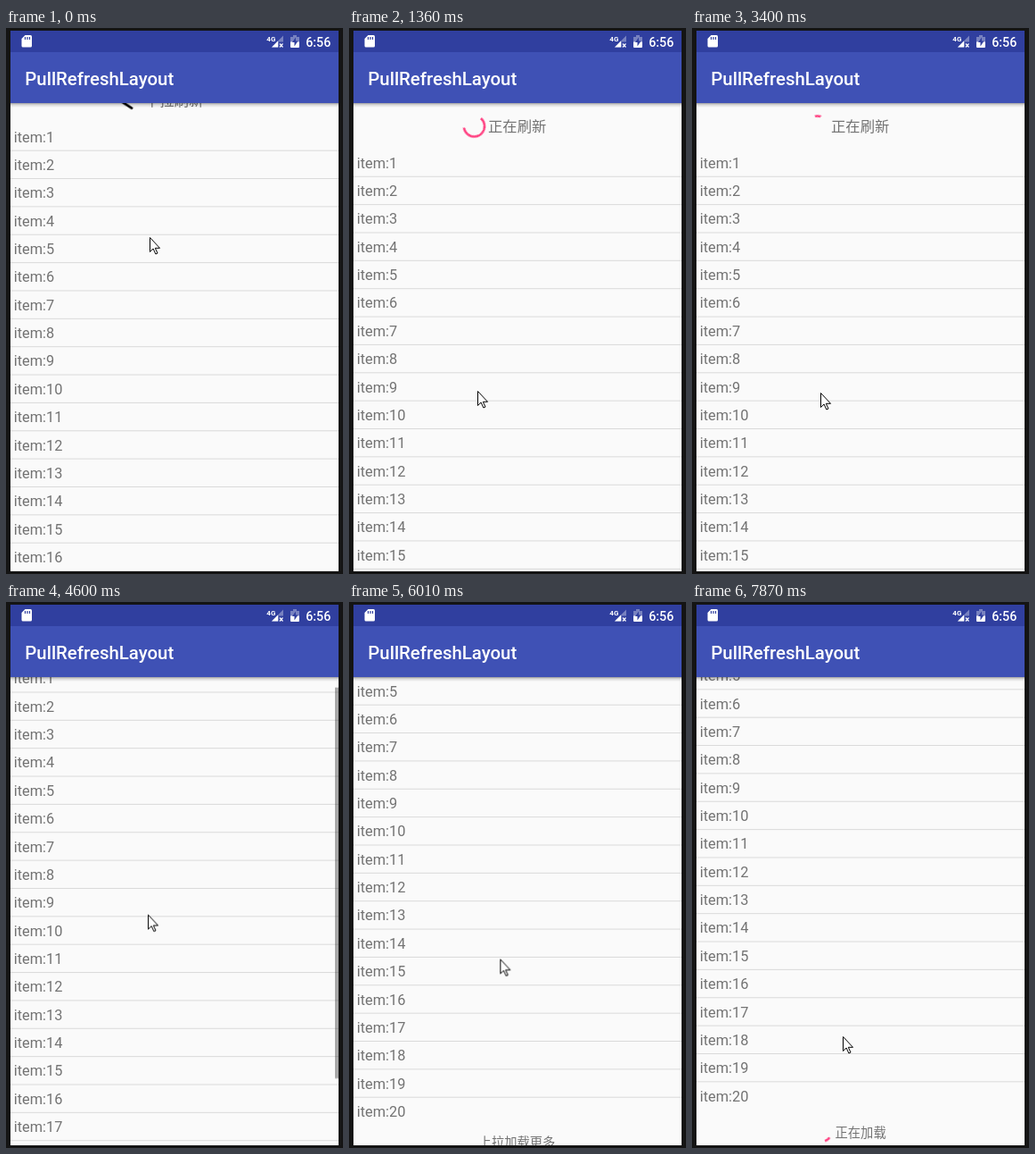
An HTML page for the animation above (8000 ms loop, 378 by 611 pixels).

```html
<!DOCTYPE html>
<html lang="zh-CN">
<head>
<meta charset="utf-8">
<title>PullRefreshLayout</title>
<style>
html, body { margin: 0; width: 100%; height: 100%; overflow: hidden; background: #141414; }
svg { display: block; }
text { font-family: Roboto, "Noto Sans CJK SC", "Noto Sans CJK", sans-serif; fill: #737373; }
.row { font-size: 16.35px; }
.foot { font-size: 14.3px; }
.bar { fill: #fff; font-weight: 500; }

#list, #cursor, #arrow, #thumb, .drift, .phase { animation: 8s linear infinite; }
#list { animation-name: scroll; }
#cursor { animation-name: point; }
#arrow { animation-name: flip; }
#thumb { animation-name: thumb; }
#pull { animation: pull 8s step-end infinite; }
#busy { animation: busy 8s step-end infinite; }
#more { animation: more 8s step-end infinite; }
#load { animation: load 8s step-end infinite; }

/* Percentages are ms / 80 */
@keyframes scroll {
  0%, 1.875% { transform: translateY(22.3px); }
  10% { transform: translateY(95px); animation-timing-function: ease-out; }
  13.2%, 50% { transform: translateY(51.4px); }
  53%, 54.4% { transform: translateY(0); }
  55.6% { transform: translateY(-4px); }
  57.5% { transform: translateY(-13.6px); }
  60% { transform: translateY(-75px); animation-timing-function: ease-out; }
  61.9%, 66.25% { transform: translateY(-103px); }
  69.125% { transform: translateY(-112px); }
  81.5% { transform: translateY(-139px); }
  84%, 85% { transform: translateY(-150px); animation-timing-function: ease-out; }
  87.5%, 100% { transform: translateY(-142.5px); }
}
@keyframes thumb {
  0%, 54.4% { transform: translateY(0); opacity: 0; }
  55.2% { opacity: 1; }
  55.6% { transform: translateY(3.3px); }
  57.5% { transform: translateY(11.4px); }
  60% { transform: translateY(62.6px); animation-timing-function: ease-out; }
  61.9% { transform: translateY(86px); }
  65.6% { opacity: 1; }
  68.75%, 100% { transform: translateY(86px); opacity: 0; }
}
@keyframes point {
  0%, 1.875% { transform: translate(161px, 234px); }
  10% { transform: translate(145px, 402px); }
  13%, 17.5% { transform: translate(144px, 406px); }
  18.75%, 50% { transform: translate(144px, 408px); }
  54.1% { transform: translate(158px, 375px); }
  57.5% { transform: translate(159px, 350px); }
  60% { transform: translate(161px, 275px); }
  61.9% { transform: translate(162px, 262px); }
  66.25% { transform: translate(164px, 480px); }
  69.125% { transform: translate(165px, 448px); }
  81.5% { transform: translate(174px, 348px); }
  84%, 85.6% { transform: translate(174px, 305px); }
  94.4%, 100% { transform: translate(169px, 486px); }
}
@keyframes flip {
  0%, 1.875% { transform: rotate(78deg); }
  5.125%, 100% { transform: rotate(180deg); }
}
@keyframes pull { 0% { visibility: visible; } 12.5%, 100% { visibility: hidden; } }
@keyframes busy { 0% { visibility: hidden; } 12.5% { visibility: visible; } 53.5%, 100% { visibility: hidden; } }
@keyframes more { 0% { visibility: visible; } 85%, 100% { visibility: hidden; } }
@keyframes load { 0% { visibility: hidden; } 85%, 100% { visibility: visible; } }

/* Indeterminate ring: six cycles per loop */
.turn { animation: turn 1333.333ms linear var(--lag) infinite; }
.ring {
  fill: none; stroke: #ff4081; stroke-width: 2.5;
  animation: trim 1333.333ms cubic-bezier(.4, 0, .2, 1) var(--lag) infinite;
}
.drift { animation-name: drift; }
@keyframes turn { from { transform: rotate(-90deg); } to { transform: rotate(0deg); } }
@keyframes drift { from { transform: rotate(0deg); } to { transform: rotate(90deg); } }
@keyframes trim {
  0% { stroke-dasharray: 0 360; stroke-dashoffset: 0; }
  50% { stroke-dasharray: 270 360; stroke-dashoffset: 0; }
  100% { stroke-dasharray: 0 360; stroke-dashoffset: -270; }
}
</style>
</head>
<body>
<svg width="378" height="611" viewBox="0 0 378 611">
  <defs>
    <clipPath id="view"><rect x="5" y="84" width="368" height="524"/></clipPath>
    <linearGradient id="shade" x2="0" y2="1">
      <stop offset="0" stop-opacity=".36"/>
      <stop offset=".4" stop-opacity=".13"/>
      <stop offset="1" stop-opacity="0"/>
    </linearGradient>
  </defs>

  <rect width="378" height="611" fill="#141414"/>
  <rect x="5" y="84" width="368" height="524" fill="#fafafa"/>

  <g clip-path="url(#view)">
    <g transform="translate(0 84)">
      <g id="list">
        <g id="pull">
          <g transform="translate(140.5 -25.4)">
            <path id="arrow" d="M0-10V9M-9.5.5L0 10L9.5.5" fill="none" stroke="#000" stroke-width="2.7"/>
          </g>
          <text class="row" x="156" y="-19.2">下拉刷新</text>
        </g>
        <g id="busy">
          <g transform="translate(140.5 -25.4)" style="--lag: -333.333ms">
            <g class="drift"><g class="turn"><circle class="ring" r="11.6" pathLength="360"/></g></g>
          </g>
          <text class="row" x="156" y="-19.2">正在刷新</text>
        </g>
        <g id="rows"></g>
        <text id="more" class="foot" x="188.5" y="651.4" text-anchor="middle">上拉加载更多</text>
        <g id="load">
          <g transform="translate(145 651) rotate(177)" style="--lag: -1196.667ms">
            <g class="turn"><circle class="ring" r="11.6" pathLength="360"/></g>
          </g>
          <text class="foot" x="160.5" y="657.9">正在加载</text>
        </g>
      </g>
      <rect id="thumb" x="369" width="4" height="437.5" fill="#000" fill-opacity=".33"/>
    </g>
    <rect x="5" y="84" width="368" height="5" fill="url(#shade)"/>
  </g>

  <rect x="5" y="3" width="368" height="24" fill="#303f9f"/>
  <rect x="5" y="27" width="368" height="57" fill="#3f51b5"/>
  <text class="bar" x="21.3" y="64" font-size="20.4">PullRefreshLayout</text>

  <g fill="#fff">
    <path d="M21.5 8H27.5Q29 8 29 9.5V20Q29 21.500 27.500 21.500H19Q17.500 21.500 17.500 20V12Z"/>
    <path d="M21.500 10v3M24 10v3M26.500 10v3" stroke="#303f9f" stroke-width="1.200"/>
    <text class="bar" x="292.3" y="14.500" font-size="8" style="font-weight: 700">4G</text>
    <path d="M298 21.500L311 8.500V15.500H306V21.500Z" opacity=".35"/>
    <path d="M298 21.500L305 14.500V21.500Z"/>
    <path d="M307 17.500l3.500 4m0-4l-3.500 4" stroke="#fff" stroke-width="1.200"/>
    <path d="M319 10h3V8h4v2h3v6h-10z" opacity=".35"/>
    <path d="M319 15.500h10V21q0 1-1 1h-8q-1 0-1-1z"/>
    <path d="M325 10.500l-4 5.500h2.500v4.500l4-6H325z" fill="#303f9f"/>
    <text class="bar" x="364.3" y="20.700" font-size="14.3" text-anchor="end">6:56</text>
  </g>

  <path id="cursor" d="M.5.5V16.500L4.100 13L6.900 19L9 18L6.300 12.300H11.500Z" fill="#fff" stroke="#000"/>
</svg>
<script>
const ROW = 31.36;
let rows = '';
for (let i = 0; i < 20; i++) {
  const y = i * ROW;
  rows += `<text class="row" x="8.800" y="${y + 21.3}">item:${i + 1}</text>`;
  if (i < 19) rows += `<rect x="5" y="${y + ROW - 1}" width="368" height="1" fill="#dadada"/>`;
}
document.getElementById('rows').innerHTML = rows;
</script>
</body>
</html>
```
